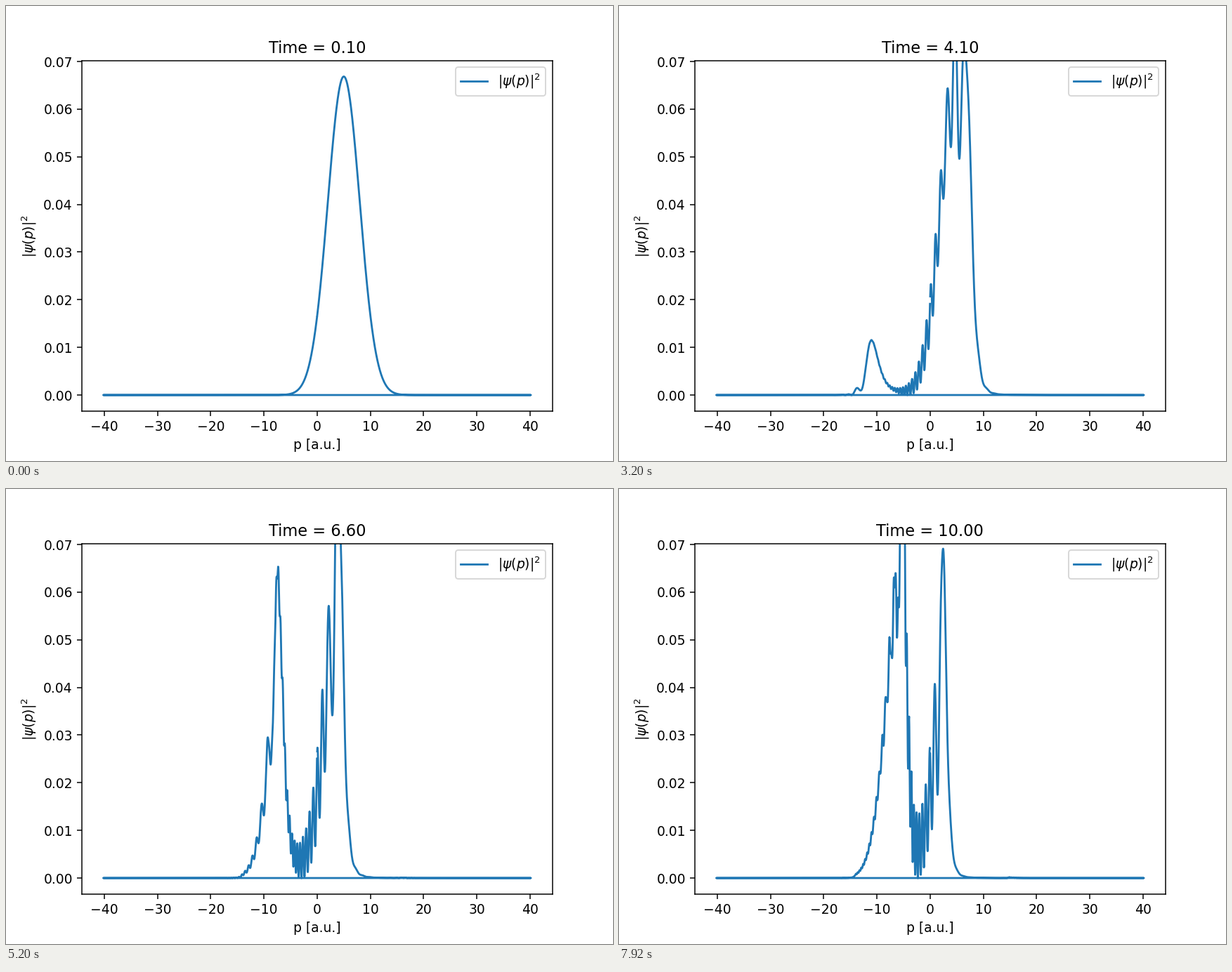
A matplotlib script for the animation above (8000 ms loop, 864 px wide and 648 px high).

```python
import numpy as np
import matplotlib.pyplot as plt
from matplotlib.animation import FuncAnimation

# Wave packet hitting a square barrier, atomic units
POINTS, LENGTH = 2048, 160.0
MASS, START, MOMENTUM, SPREAD = 5.0, -10.0, 5.0, 3.0
HEIGHT, HALF_WIDTH = 20.0, 2.5
FRAMES, FRAME_TIME, SUBSTEPS = 100, 0.1, 20
INTERVAL = 80

dx = LENGTH / POINTS
x = -LENGTH / 2 + dx * np.arange(POINTS)
p = 2 * np.pi * np.fft.fftfreq(POINTS, dx)


def initial_packet():
    psi = np.exp(-(SPREAD * (x - START)) ** 2 + 1j * MOMENTUM * x)
    return psi / np.sqrt(np.sum(np.abs(psi) ** 2) * dx)


def momentum_densities():
    """Split-operator evolution, sampled once per frame."""
    dt = FRAME_TIME / SUBSTEPS
    barrier = np.where(np.abs(x) <= HALF_WIDTH, HEIGHT, 0.0)
    half_kick = np.exp(-0.5j * barrier * dt)
    drift = np.exp(-0.5j * p ** 2 / MASS * dt)
    psi = initial_packet()
    densities = []
    for _ in range(FRAMES):
        for _ in range(SUBSTEPS):
            psi = half_kick * np.fft.ifft(drift * np.fft.fft(half_kick * psi))
        densities.append(np.abs(np.fft.fft(psi, norm="ortho")) ** 2)
    return densities


densities = momentum_densities()

fig, ax = plt.subplots(figsize=(6.4, 4.8), dpi=135)
# FFT ordering: the line runs 0..max, back along the axis, then min..0
line, = ax.plot(p, densities[0], label=r"$|\psi(p)|^2$")
ax.set_xlim(ax.get_xlim())
ax.set_ylim(ax.get_ylim())
ax.set_xlabel("p [a.u.]")
ax.set_ylabel(r"$|\psi(p)|^2$")
ax.legend(loc="upper right")
title = ax.set_title("")


def update(frame):
    line.set_ydata(densities[frame])
    title.set_text(f"Time = {(frame + 1) * FRAME_TIME:.2f}")
    return line, title


anim = FuncAnimation(fig, update, frames=FRAMES, interval=INTERVAL,
                     repeat=True, repeat_delay=0)
plt.show()
```
